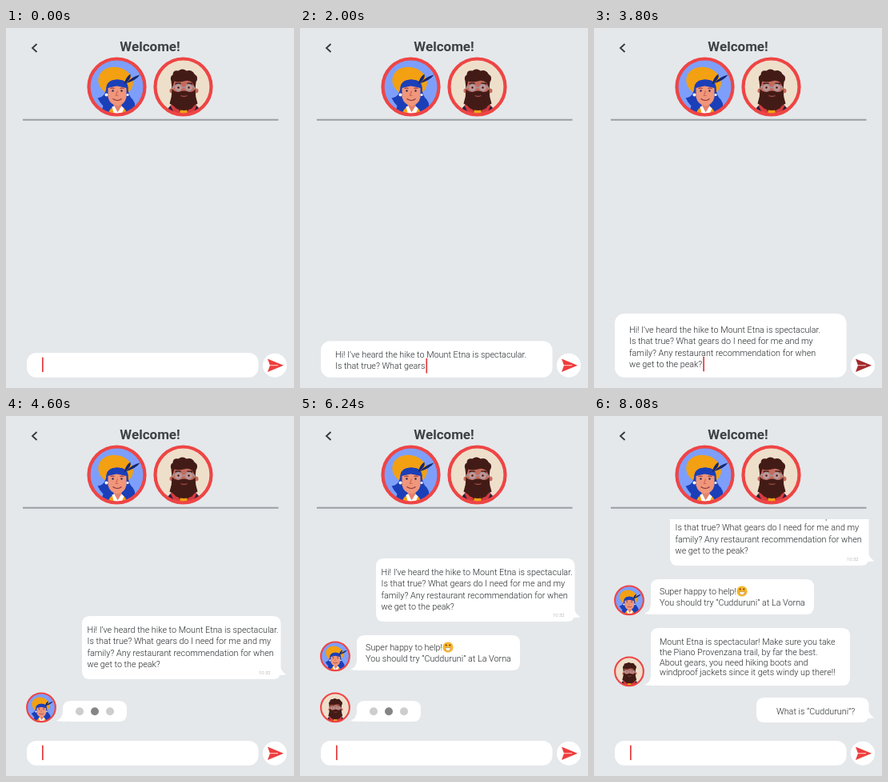
Animation, 360 px wide and 450 px high, one loop 8.12 s. Source, as an HTML page:

```html
<!DOCTYPE html>
<html lang="en">
<head>
<meta charset="utf-8">
<title>Chat</title>
<style>
  html, body { margin: 0; width: 100%; height: 100%; overflow: hidden; background: #e4e8eb; }
  svg { display: block; width: 360px; height: 450px; }
  text { font: 300 10.8px Roboto, Arial, sans-serif; fill: #25282b; white-space: pre; }
  .title { font-size: 17px; font-weight: 700; fill: #3e4144; }
  .time { font-size: 6px; fill: #999; }
</style>
</head>
<body>
<svg viewBox="0 0 360 450">
  <defs>
    <clipPath id="disc"><circle r="34"/></clipPath>
    <clipPath id="view"><rect y="129" width="360" height="321"/></clipPath>
    <g id="woman">
      <g clip-path="url(#disc)">
        <circle r="36" fill="#7d9ffb"/>
        <ellipse cx="-3" cy="-6" rx="22" ry="18" transform="rotate(14)" fill="#f3a012"/>
        <path d="M-13 0Q-12-8 0-9Q13-9 14 0Q14 11 20 16Q26 24 20 36H-18Q-19 28-17 24Q-21 20-24 14Q-14 13-13 0Z" fill="#1b3fb8"/>
        <path d="M-12 38Q-10 27-4 25H6Q12 27 14 38Z" fill="#f3a012"/>
        <path d="M-4 18H6V28L1 34L-4 28Z" fill="#e3826b"/>
        <path d="M-6 25L-3 24L1 32L6 24L9 27L5 36H-3Z" fill="#fff"/>
        <path d="M-11-2H12V13Q10 22 1 24Q-9 22-11 13Z" fill="#f0967a"/>
        <path d="M-13 2Q-12-9 0-9Q13-9 14 2Q6 0 0-1Q-6 0-13 2Z" fill="#1b3fb8"/>
        <path d="M-8 2Q-6 1-3 2M4 2Q7 1 9 2M-5 15Q1 19 6 15" fill="none" stroke="#8b2f3c" stroke-width="1.200"/>
        <path d="M1 5L-1 11H2" fill="none" stroke="#cf6a58" stroke-width="1.200"/>
        <circle cx="-5" cy="5" r="1.200" fill="#2b2a55"/><circle cx="6" cy="5" r="1.200" fill="#2b2a55"/>
        <circle cx="-13" cy="10" r="2" fill="#fff"/><circle cx="13.500" cy="10" r="1.600" fill="#fff"/>
        <path d="M9-3Q11-12 17-16Q19-10 9-3ZM11-4Q19-13 29-15Q24-8 11-4Z" fill="#17276f"/>
      </g>
      <circle r="35" fill="none" stroke="#ee4545" stroke-width="4.200"/>
    </g>
    <g id="man">
      <g clip-path="url(#disc)">
        <circle r="36" fill="#eedfcb"/>
        <path d="M-22 38Q-21 24-11 21H12Q22 24 23 38Z" fill="#29203c"/>
        <path d="M-16 23L-9 21L-2 36H-10ZM17 23L10 21L3 36H11Z" fill="#d63b3f"/>
        <path d="M-3 22H4L6 38H-5Z" fill="#f3a012"/>
        <circle cx="-14" cy="5" r="3" fill="#c46b5c"/><circle cx="16" cy="5" r="3" fill="#c46b5c"/>
        <path d="M-13-12H14V10H-13Z" fill="#c46b5c"/>
        <path d="M-14 3Q-9 8-4 6Q1 4 6 6Q11 8 15 3Q15 12 18 21Q13 23 11 27Q1 32-9 27Q-12 23-17 21Q-14 12-14 3Z" fill="#431b16"/>
        <path d="M-14 3L-15-7Q-17-13-13-15Q-13-21-6-20Q-1-24 4-20Q11-22 14-16Q20-12 16-6L15 3L12-5Q7-9 1-7Q-7-5-11-7Z" fill="#431b16"/>
        <path d="M-10-4H-3M5-4H12" stroke="#431b16" stroke-width="1.800"/>
        <g fill="#cf948c" stroke="#a09aa6" stroke-width="1.500"><circle cx="-6" cy="1" r="4"/><circle cx="7" cy="1" r="4"/><path d="M-2 1H3M-13 0H-10M11 0H14"/></g>
        <circle cx="-6" cy="1" r="1.200" fill="#321818"/><circle cx="7" cy="1" r="1.200" fill="#321818"/>
        <path d="M-3 11Q1 13 5 11" fill="none" stroke="#a04c45" stroke-width="1.300"/>
      </g>
      <circle r="35" fill="none" stroke="#ee4545" stroke-width="4.200"/>
    </g>
  </defs>
  <rect width="360" height="450" fill="#e4e8eb"/>
  <path d="M38.500 20L33 25L38.500 30" fill="none" stroke="#33363a" stroke-width="1.800"/>
  <text class="title" x="180" y="28.700" text-anchor="middle">Welcome!</text>
  <use href="#woman" x="138.500" y="73.500"/>
  <use href="#man" x="221.500" y="73.500"/>
  <path d="M21 114.700H340.500" stroke="#9b9ea3" stroke-width="2"/>
  <g clip-path="url(#view)"><g id="chat"></g></g>
  <rect id="box" x="26" width="289.500" rx="12" fill="#fff"/>
  <g id="draft"></g>
  <rect id="caret" width="1.700" height="18.500" fill="#e23b3c"/>
  <circle cx="336" cy="421.700" r="15" fill="#fff"/>
  <path id="arrow" d="M327 413.500L347 421.700L327 430L330 421.700Z"/>
  <path d="M329.500 421.700H340" stroke="#fff" stroke-width=".8"/>
</svg>
<script>
const LOOP = 8120;
const QUESTION = ["Hi! I’ve heard the hike to Mount Etna is spectacular.",
  "Is that true? What gears do I need for me and my",
  "family? Any restaurant recommendation for when", "we get to the peak?"];
const HELP = ["Super happy to help!", "You should try “Cudduruni” at La Vorna"];
const ADVICE = ["Mount Etna is spectacular! Make sure you take",
  "the Piano Provenzana trail, by far the best.",
  "About gears, you need hiking boots and", "windproof jackets since it gets windy up there!!"];
const REPLY = ["What is “Cudduruni”?"];

const $ = id => document.getElementById(id);
const set = (el, attrs) => { for (const k in attrs) el.setAttribute(k, attrs[k]); };
const make = (tag, parent, attrs = {}) => {
  const el = document.createElementNS("http://www.w3.org/2000/svg", tag);
  set(el, attrs);
  return parent.appendChild(el);
};
const ramp = (t, start, length) => Math.min(1, Math.max(0, (t - start) / length));
const ease = p => 1 - (1 - p) ** 3;
const mix = (a, b, p) => a + (b - a) * p;

function addText(parent, lines, x, y, pitch) {
  const g = make("g", parent);
  lines.forEach((s, i) => make("text", g, { x, y: y + i * pitch }).textContent = s);
  return g;
}

function bubble(x, y, w, h, right) {
  const r = x + w, b = y + h, c = 10;
  const body = `M${x + c} ${y}H${r - c}Q${r} ${y} ${r} ${y + c}V${b - c}Q${r} ${b} ${r - c} ${b}H${x + c}Q${x} ${b} ${x} ${b - c}V${y + c}Q${x} ${y} ${x + c} ${y}Z`;
  return body + (right
    ? `M${r - 1} ${b - 19}Q${r} ${b - 9} ${r + 7} ${b - 6}Q${r} ${b - 4} ${r - 8} ${b - 6}Z`
    : `M${x + 12} ${b - 1}Q${x + 2} ${b + 1} ${x - 8} ${b - 1}Q${x} ${b - 4} ${x} ${b - 13}Z`);
}

// Own messages slide in; incoming ones grow out of a typing indicator.
function sent(lines, x, y, h, textX, at) {
  const g = make("g", $("chat"));
  make("path", g, { d: bubble(x, y, 343.5 - x, h, true), fill: "#fff" });
  addText(g, lines, textX, y + 21, 14.4);
  if (h > 40) {
    make("text", g, { class: "time", x: 316, y: y + 73 }).textContent = "10:32";
  }
  return t => set(g, {
    opacity: ramp(t, at - 1, 80),
    transform: `translate(0 ${18 * (1 - ease(ramp(t, at, 160)))})`
  });
}

function received(who, lines, waitY, y, w, h, first, pitch, at, done) {
  const g = make("g", $("chat"));
  const shape = make("path", g, { fill: "#fff" });
  const face = make("use", g, { href: "#" + who });
  const dots = [92, 111, 130].map(cx => make("circle", g, { cx, cy: waitY + 13.3, r: 5 }));
  const words = addText(g, lines, 82, y + first, pitch);
  if (who === "woman") {
    make("circle", words, { cx: 185, cy: y + 15, r: 6.6, fill: "#f8b62e" });
    make("path", words, { d: `M181.500 ${y + 15.7}H188.500Q188 ${y + 19.7} 185 ${y + 19.7}Q182 ${y + 19.7} 181.500 ${y + 15.7}Z`, fill: "#fff", stroke: "#a8661c", "stroke-width": .5 });
    for (const cx of [182.7, 187.3]) make("circle", words, { cx, cy: y + 12.5, r: 1, fill: "#5b3510" });
  }
  return t => {
    const p = ease(ramp(t, done, 160));
    const top = mix(waitY, y, p), high = mix(26, h, p);
    const active = Math.floor((t - at) / 200) % 3;
    set(g, { opacity: ramp(t, at, 100) });
    set(shape, { d: bubble(71, top, mix(80, w, p), high) });
    set(face, { transform: `translate(44 ${top + high - 17.7}) scale(.51)` });
    dots.forEach((dot, i) => set(dot, { opacity: t < done ? 1 : 0, fill: i === active ? "#858585" : "#cdcdcd" }));
    set(words, { opacity: ramp(t, done + 60, 80) });
  };
}

const items = [
  sent(QUESTION, 95, 0, 79, 101.5, 3960),
  received("woman", HELP, 106, 96, 204, 44, 19, 14.4, 4260, 5120),
  received("man", ADVICE, 178, 157, 249, 72, 20.7, 12.9, 5900, 6360),
  sent(REPLY, 203, 244, 31, 228, 7240)
];

// [start, distance] of each upward scroll
const scrolls = [[4200, 54], [5120, 7], [5820, 65], [6360, 24], [7220, 46]];
const boxTop = [406, 391.3, 374, 357];
const firstMid = [421, 408, 392.5, 377];
const drafts = [
  { lines: QUESTION, keys: [[400, 0], [1440, 54], [2000, 78.5], [2480, 103], [3300, 150], [3640, 169]], press: 3720, send: 3960 },
  { lines: REPLY, keys: [[6540, 0], [6990, 20]], press: 7040, send: 7240 }
];
const rows = [...addText($("draft"), ["", "", "", ""], 44, 0, 0).children];

function typed(keys, t) {
  return Math.floor(keys.slice(1).reduce((n, [end, count], i) => {
    const [start, from] = keys[i];
    return n + (count - from) * ramp(t, start, end - start);
  }, 0));
}

function drawInput(t) {
  const d = drafts.find(d => t >= d.keys[0][0] && t < d.send);
  let left = d ? typed(d.keys, t) : 0, n = 0;
  rows.forEach((row, i) => {
    const line = d && d.lines[i] || "";
    row.textContent = left > 0 ? line.slice(0, left) : "";
    if (left > 0 && line) n = i;
    left -= line.length + 1;
  });
  rows.forEach((row, i) => set(row, { y: firstMid[n] + 3.8 + i * 14.4 }));
  set($("box"), { y: boxTop[n], height: 436.7 - boxTop[n] });
  const width = rows[n].textContent ? rows[n].getComputedTextLength() : 0;
  set($("caret"), { x: 45 + width, y: firstMid[n] + n * 14.4 - 9.4 });
  set($("arrow"), { fill: d && t >= d.press ? "#a32a2c" : "#ee3d3d" });
}

function frame(now) {
  const t = now % LOOP;
  const y = scrolls.reduce((y, [start, by]) => y - by * ease(ramp(t, start, 180)), 304);
  set($("chat"), { transform: `translate(0 ${y})` });
  items.forEach(draw => draw(t));
  drawInput(t);
  requestAnimationFrame(frame);
}
requestAnimationFrame(frame);
</script>
</body>
</html>
```
